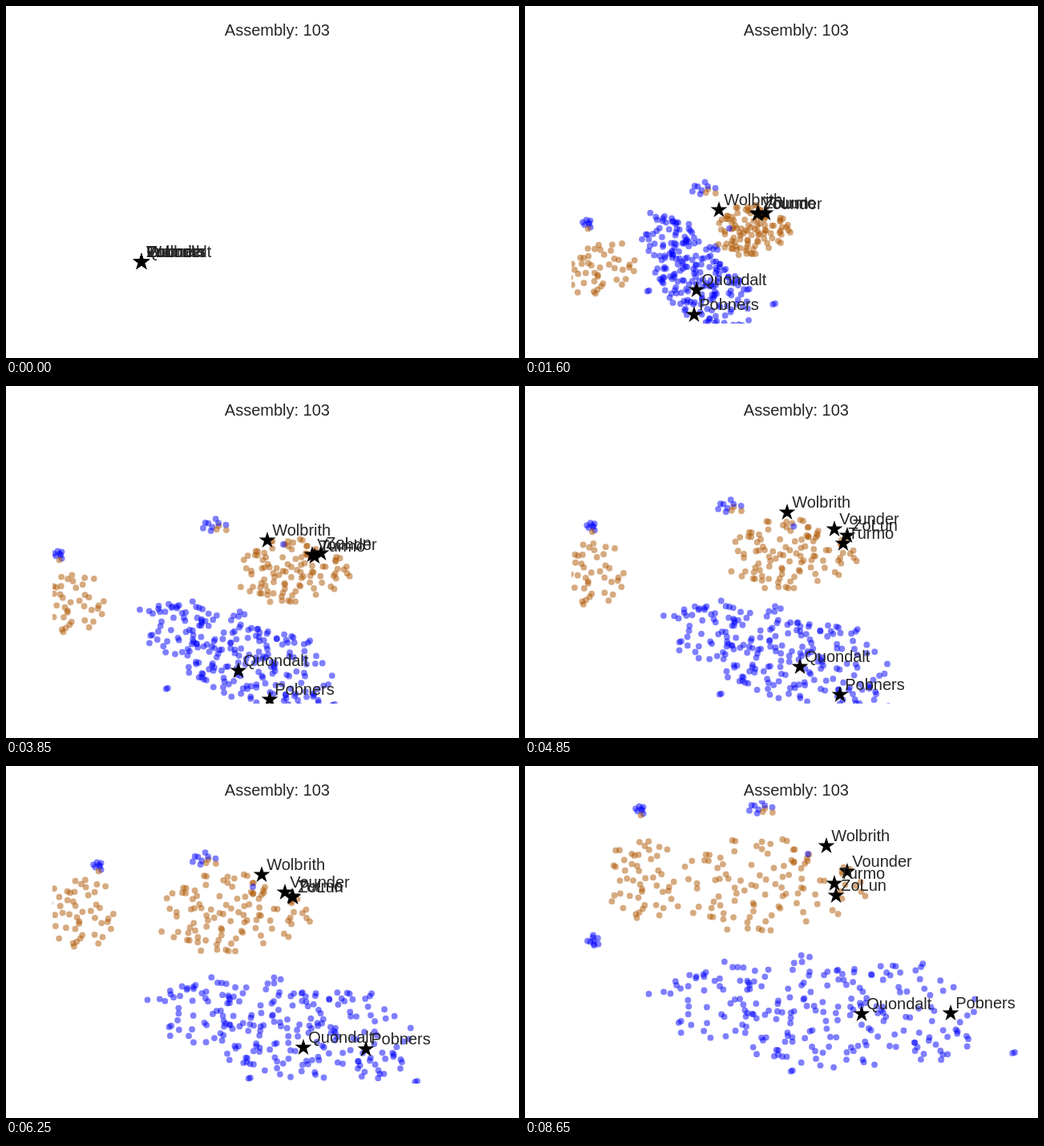
Recreate the animation shown at these times as an HTML page with a canvas. Size 640 by 440 pixels, loop 8.7 s.

```html
<!DOCTYPE html>
<html lang="en">
<head>
<meta charset="utf-8">
<title>Assembly map</title>
<style>
html, body { margin: 0; width: 100%; height: 100%; overflow: hidden; background: #fff; }
canvas { display: block; }
</style>
</head>
<body>
<canvas id="stage" width="640" height="440"></canvas>
<script>
const ctx = document.getElementById('stage').getContext('2d');
const LOOP = 8700, STEP = 50, FIRST_HOLD = 150;
const BEGIN = 100, SPREAD_OUT = 1600, END = 8650;
const GROUP_TIMES = [BEGIN, SPREAD_OUT, 3850, 6250, END];
const STAR_TIMES = [BEGIN, SPREAD_OUT, 3850, 4850, 6250, 7400, END];
const START = [169, 320];
const AXES = { x: 58, y: 43, w: 560, h: 354 };
const BLUE = 'rgba(0,0,255,.5)', BROWN = 'rgba(174,85,0,.5)';
const INK = '#262626';
const GOLDEN_ANGLE = Math.PI * (3 - Math.sqrt(5));

// Elliptical groups of dots: half axes once spread out and at the end, tilt, fan-out to the right
const groups = [
  { blue: 226, size: [92, 45], grown: [206, 72], tilt: 0.9, fan: 0.2,
    path: [[212, 335], [287, 334], [345, 325], [365, 305]] },
  { brown: 50, size: [62, 30], grown: [50, 50],  tilt: -0.28,
    path: [[90, 329], [77, 272], [92, 184], [147, 142]] },
  { brown: 106, size: [48, 32], grown: [124, 60], tilt: -0.1,
    path: [[283, 280], [357, 231], [282, 184], [302, 149]] },
  { blue: 7, brown: 4, size: [19, 9], path: [[225, 229], [262, 175], [249, 117], [296, 53]] },
  { blue: 6, brown: 2, size: [10, 6], path: [[78, 273], [66, 212], [115, 126], [144, 56]] },
  { blue: 9, size: [10, 7], path: [[18, 300], [20, 265], [42, 235], [85, 218]] },
  { blue: 2, size: [2, 2], path: [[311, 372], [409, 398], [512, 394], [610, 358]] },
  { blue: 2, size: [2, 2], path: [[154, 356], [201, 378], [304, 390], [333, 381]] },
  { blue: 1, size: [0, 0], path: [[255, 278], [346, 198], [308, 151], [353, 110]] }
];

const people = [
  { name: 'Wolbrith', path: [[242, 255], [326, 193], [327, 158], [319, 136], [311, 121], [376, 100]] },
  { name: 'Vounder', path: [[290, 260], [382, 211], [386, 179], [348, 158], [331, 154], [402, 132]] },
  { name: 'Turmo', path: [[300, 259], [385, 213], [397, 197], [357, 163], [338, 152], [386, 147]] },
  { name: 'ZoLun', path: [[291, 259], [393, 209], [402, 187], [358, 164], [330, 156], [388, 162]] },
  { name: 'Quondalt', path: [[214, 355], [290, 356], [343, 351], [371, 352], [408, 336], [420, 310]] },
  { name: 'Pobners', path: [[211, 386], [329, 392], [393, 386], [449, 354], [486, 324], [531, 309]] }
];

let seed = 10345;
const random = () => (seed = (seed * 16807) % 2147483647) / 2147483647;
const jitter = amount => (random() * 2 - 1) * amount;
const progress = (t, from, to) => Math.min(1, Math.max(0, (t - from) / (to - from)));
const mix = (a, b, p) => a + (b - a) * p;

// Smooth curve through the points, with a quick departure from the start
function pointAt(times, path, t) {
  if (t <= times[0]) return path[0];
  const last = times.length - 1;
  let i = 0;
  while (i < last - 1 && t > times[i + 1]) i++;
  const span = times[i + 1] - times[i], p = (t - times[i]) / span, q = 1 - p;
  const slope = (k, axis) => {
    const a = Math.max(0, k - 1), b = Math.min(last, k + 1);
    return (path[b][axis] - path[a][axis]) / (times[b] - times[a]) * (k ? 1 : 1.8);
  };
  return path[i].map((from, axis) =>
    from * q * q * (1 + 2 * p) + path[i + 1][axis] * p * p * (3 - 2 * p) +
    span * p * q * (q * slope(i, axis) - p * slope(i + 1, axis)));
}

// Scatter dots over the unit disc, a little denser towards its middle
function scatter({ blue = 0, brown = 0, fan = 0 }) {
  const count = blue + brown;
  return Array.from({ length: count }, (_, i) => {
    const r = Math.pow((i + random()) / count, 0.55);
    const angle = i * GOLDEN_ANGLE + jitter(0.6);
    const u = r * Math.cos(angle) + jitter(0.05);
    const v = (r * Math.sin(angle) + jitter(0.05)) * (1 + fan * u);
    return { u, v, color: random() * count < blue ? BLUE : BROWN };
  });
}

for (const group of groups) {
  group.path.unshift(START);
  group.dots = scatter(group);
}
for (const person of people) person.path.unshift(START);

function drawGroup({ path, dots, size, grown = size, tilt = 0 }, t) {
  const [x, y] = pointAt(GROUP_TIMES, path, t);
  const open = 1 - (1 - progress(t, BEGIN, SPREAD_OUT)) ** 2;
  const growth = progress(t, SPREAD_OUT, END);
  const long = open * mix(size[0], grown[0], growth);
  const wide = open * mix(size[1], grown[1], growth);
  const angle = tilt * Math.exp(-Math.max(0, t - SPREAD_OUT) / 2700);
  const cos = Math.cos(angle), sin = Math.sin(angle);
  for (const { u, v, color } of dots) {
    const along = u * long, across = v * wide;
    ctx.fillStyle = color;
    ctx.beginPath();
    ctx.arc(x + along * cos - across * sin, y + along * sin + across * cos, 3.9, 0, Math.PI * 2);
    ctx.fill();
  }
}

function drawStar([x, y]) {
  ctx.fillStyle = '#000';
  ctx.beginPath();
  for (let i = 0; i < 10; i++) {
    const r = i % 2 ? 4.2 : 11, a = i * Math.PI / 5;
    ctx.lineTo(x + r * Math.sin(a), y - r * Math.cos(a));
  }
  ctx.fill();
}

function draw(t) {
  ctx.fillStyle = '#fff';
  ctx.fillRect(0, 0, 640, 440);
  const places = people.map(({ path }) => pointAt(STAR_TIMES, path, t));

  ctx.save();
  ctx.beginPath();
  ctx.rect(AXES.x, AXES.y, AXES.w, AXES.h);
  ctx.clip();
  groups.forEach(group => drawGroup(group, t));
  places.forEach(drawStar);
  ctx.restore();

  ctx.fillStyle = INK;
  ctx.font = '20px "Liberation Sans", Arial, sans-serif';
  ctx.textAlign = 'left';
  people.forEach(({ name }, i) => ctx.fillText(name, places[i][0] + 6.2, places[i][1] - 5.6));
  ctx.textAlign = 'center';
  ctx.fillText('Assembly: 103', 338.4, 37);
}

const began = performance.now();
function tick() {
  const t = (performance.now() - began) % LOOP;
  draw(t < FIRST_HOLD ? 0 : Math.floor(t / STEP) * STEP);
  requestAnimationFrame(tick);
}
tick();
</script>
</body>
</html>
```
